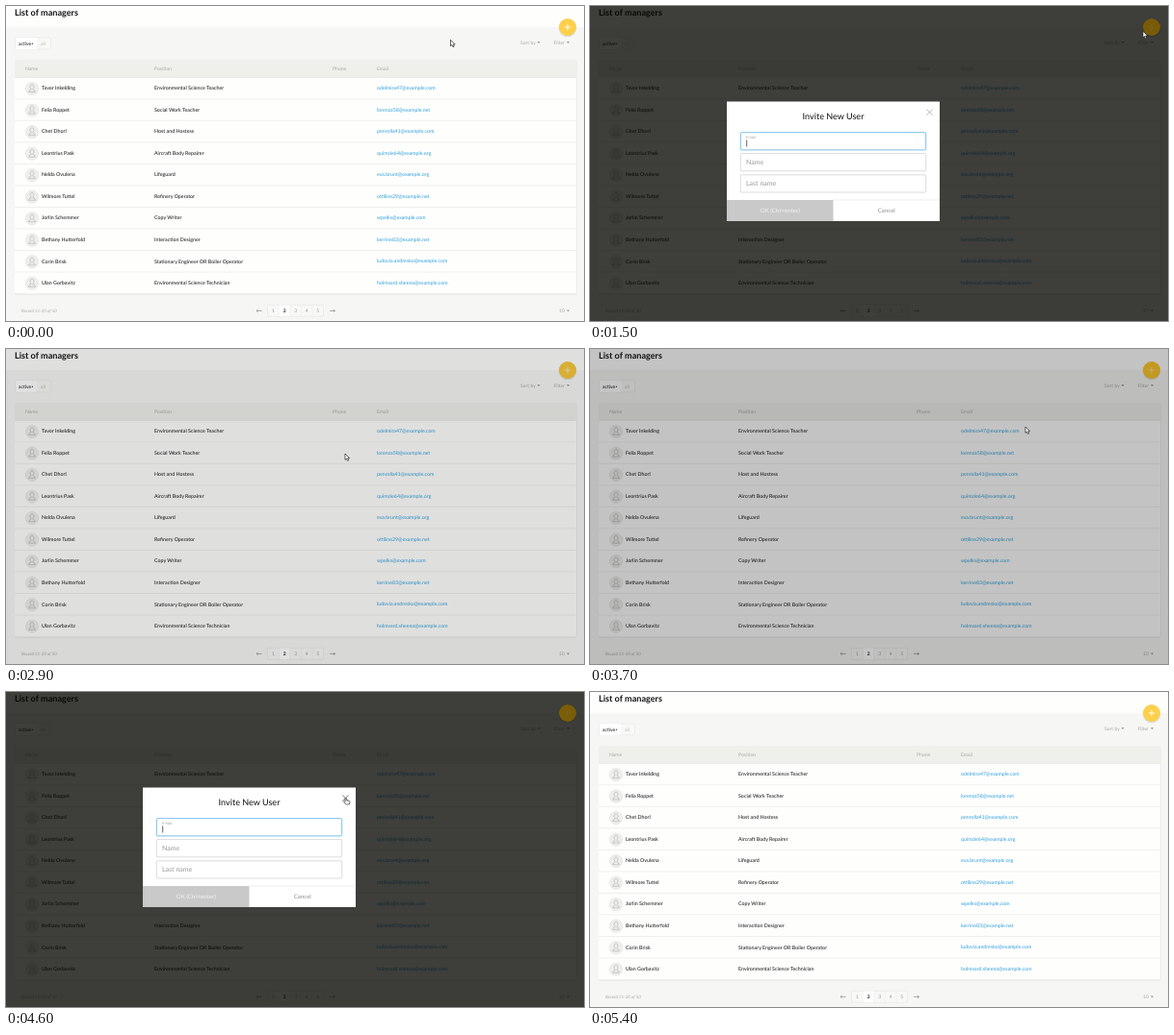
Animation of 600x328 px, one loop 6000 ms. Source, as an HTML page:

```html
<!DOCTYPE html>
<html lang="en">
<head>
<meta charset="utf-8">
<title>List of managers</title>
<style>
  html, body { margin: 0; width: 100%; height: 100%; overflow: hidden; background: #f6f6f4; }
  svg { display: block; width: 600px; height: 328px; }
  text { font-family: Lato, "Open Sans", sans-serif; text-rendering: geometricPrecision; }
</style>
</head>
<body>
<svg id="stage" viewBox="0 0 600 328" xmlns="http://www.w3.org/2000/svg"></svg>
<script>
const stage = document.getElementById('stage');
const LOOP = 6000, STEP = 100;

function add(parent, tag, attrs, text) {
  const el = document.createElementNS('http://www.w3.org/2000/svg', tag);
  for (const key in attrs) el.setAttribute(key, attrs[key]);
  if (text) el.textContent = text;
  parent.appendChild(el);
  return el;
}
const group = (parent = stage) => add(parent, 'g', {});
const rect = (p, x, y, width, height, fill, more) =>
  add(p, 'rect', { x, y, width, height, fill, ...more });
const label = (p, x, y, size, fill, text, more) =>
  add(p, 'text', { x, y, 'font-size': size, fill, ...more }, text);
const path = (p, d, stroke, width, more) =>
  add(p, 'path', { d, stroke, 'stroke-width': width, fill: 'none', ...more });
const mid = { 'text-anchor': 'middle' };
const bold = { 'font-weight': 700 };

// Page
const page = group();
const GREY = '#a9a9a7';
rect(page, 0, 0, 600, 328, '#f6f6f4');
rect(page, 0, 0, 600, 22, '#fefefd');
label(page, 9, 10.2, 9.1, '#161616', 'List of managers', bold);

rect(page, 9.5, 33, 37, 12, '#f8f8f6', { stroke: '#e6e6e4', 'stroke-width': .6, rx: 1 });
rect(page, 10, 33, 22, 12, '#fff', { rx: 1 });
label(page, 13, 40.6, 5, '#222', 'active', { 'font-weight': 500 });
add(page, 'circle', { cx: 27.4, cy: 39.2, r: .7, fill: '#444' });
label(page, 36, 40.6, 5, '#b8b8b6', 'all');

function menu(x, y, text, arrowX) {
  label(page, x, y, 5, GREY, text);
  add(page, 'path', { d: `M${arrowX - 1.5} ${y - 2.7}h3l-1.5 2z`, fill: '#999' });
}
menu(534, 39.8, 'Sort by', 553);
menu(568.5, 39.8, 'Filter', 583.5);

// Table
const COLS = [20, 154, 339, 385];
const ROWS = [
  ['Tavor Inkelding', 'Environmental Science Teacher', 'odelmira47@example.com'],
  ['Felia Roppet', 'Social Work Teacher', 'lorenza58@example.net'],
  ['Chet Dhorl', 'Host and Hostess', 'penrolla41@example.com'],
  ['Leontrius Pask', 'Aircraft Body Repairer', 'quimzie64@example.org'],
  ['Nelda Ovulena', 'Lifeguard', 'eva.brunt@example.org'],
  ['Wilmore Tuttel', 'Refinery Operator', 'ottiline29@example.net'],
  ['Jorlin Schemmer', 'Copy Writer', 'wpelks@example.com'],
  ['Bethany Hutterfold', 'Interaction Designer', 'kerrine83@example.net'],
  ['Corin Brisk', 'Stationary Engineer OR Boiler Operator', 'ludovia.andresko@example.com'],
  ['Ulan Gorbavitz', 'Environmental Science Technician', 'holmvard.sheena@example.com']
];
rect(page, 9, 56.5, 583.5, 244, '#e3e3e1', { rx: 1.5 });
rect(page, 9, 56, 583, 243.5, '#fefefd', { rx: 1.5 });
rect(page, 9, 56, 583, 18.3, '#efefec', { rx: 1.5 });
path(page, 'M9 74.4H592', '#dededb', .6);
['Name', 'Position', 'Phone', 'Email'].forEach((t, i) => label(page, COLS[i], 66.8, 5.1, GREY, t));

ROWS.forEach(([name, job, mail], i) => {
  const y = 85.4 + i * 22.53;
  add(page, 'circle', { cx: 27, cy: y + .6, r: 6.6, fill: '#efefed', stroke: '#dededc', 'stroke-width': .6 });
  path(page, `M23.6 ${y + 4.2}q.2-2.1 2.4-2.5v-.9a2 2.4 0 1 1 2 0v.9q2.2.4 2.4 2.5z`, '#aaaaa8', .6);
  label(page, 37, y + 1.9, 5.3, '#222', name, { 'font-weight': 500 });
  label(page, COLS[1], y + 1.9, 5.3, '#222', job, { 'font-weight': 500 });
  label(page, COLS[3], y + 1.6, 5.25, '#2fa0dc', mail);
  if (i < ROWS.length - 1) path(page, `M9 ${y + 11.4}H592`, '#e6e6e3', .6);
});

// Pager
label(page, 16, 318.8, 4.5, GREY, 'Record 11-20 of 50', { 'font-style': 'italic' });
path(page, 'M265.5 317.4h-5.5m1.5-1.4l-1.5 1.4l1.5 1.4M336 317.4h5.5m-1.5-1.4l1.5 1.4l-1.5 1.4', '#888', .7);
rect(page, 271.5, 311.3, 58, 12, '#f8f8f6', { stroke: '#e4e4e2', 'stroke-width': .6, rx: 1 });
rect(page, 283.2, 311.5, 11.6, 11.6, '#fff');
for (let n = 1; n <= 5; n++) {
  const x = 266 + n * 11.55;
  if (n < 5) path(page, `M${x + 5.7} 311.3v12`, '#e8e8e6', .5);
  label(page, x, 319.1, 5, n === 2 ? '#222' : '#999', String(n), n === 2 ? { ...mid, ...bold } : mid);
}
menu(574, 319.1, '10', 583.5);

// Round button
add(page, 'circle', { cx: 583, cy: 22.8, r: 9.3, fill: '#000', opacity: .1 });
const button = add(page, 'circle', { cx: 583, cy: 22, r: 9, fill: '#fdd04c' });
path(page, 'M583 18.8v6.4M579.8 22h6.4', '#fff', .9);

const shade = rect(stage, 0, 0, 600, 328, '#040400');
const glow = add(stage, 'circle', { cx: 583, cy: 22, r: 9, fill: '#c49000' });

// Dialog
const dialog = group();
rect(dialog, 142, 99.5, 221, 124.5, '#fff');
label(dialog, 252.5, 118.3, 9.05, '#222', 'Invite New User', { ...mid, 'font-weight': 500 });
const cross = path(dialog, 'M349.4 107.6l6.2 6.2m0-6.2l-6.2 6.2', '#999', .7);
const fields = [131.7, 153.6, 175.8].map(y =>
  rect(dialog, 156.3, y, 192.4, 18.2, '#fff', { stroke: '#d2d2d2', 'stroke-width': .8, rx: 1 }));
const hint = label(dialog, 162, 142.8, 7, '#999', 'E-Mail');
label(dialog, 162, 164.6, 7, '#999', 'Name');
label(dialog, 162, 186.8, 7, '#999', 'Last name');
const caret = path(dialog, 'M162.7 139.5v7', '#222', .7);
rect(dialog, 142, 202, 110.5, 22, '#c9c9c9');
path(dialog, 'M252.5 202H363', '#e2e2e2', .6);
label(dialog, 197.3, 214.8, 6.1, '#f4f4f4', 'OK (Ctrl+enter)', mid);
label(dialog, 307.8, 214.8, 6.1, '#8c8c8c', 'Cancel', mid);

// Pointers, tip at 0,0
const pointer = group();
const outline = { fill: '#fff', 'stroke-linejoin': 'round' };
const arrow = path(pointer, 'M0 0v6.4l1.5-1.3l1 2.3l1.2-.5l-1-2.2h2z', '#222', .7, outline);
const hand = path(pointer,
  'M0 .2q.6-.5 1.1 0l.2 2.3l3 .6q.7.2.6 1l-.5 2.6h-3.6l-2-2.5q-.2-.9.6-.7l.8.7z', '#222', .6, outline);

// Tracks: [ms, value, ...]
const SHADE = [[900, 0], [1000, .2], [1100, .41], [1200, .59], [1300, .71], [1400, .77], [2500, .77],
  [2600, .69], [2700, .5], [2900, .12], [3000, 0], [3600, 0], [3700, .23], [3800, .43], [3900, .6],
  [4000, .71], [4100, .77], [4800, .77], [4900, .69], [5000, .5], [5200, .12], [5300, 0]];
const DIALOG = [[1100, 0], [1400, 1], [2400, 1], [2600, .5], [2800, 0],
  [3800, 0], [4100, 1], [4700, 1], [4900, .5], [5100, 0]];
const POINTER = [[200, 461.5, 35.3], [400, 490, 34], [700, 565, 28], [900, 580.5, 25.3], [1400, 579, 25.6],
  [1500, 574, 26.3], [1600, 521, 47], [1800, 440, 80], [2000, 380, 101], [2200, 352, 109], [3000, 352, 109],
  [3200, 440, 75], [3400, 579, 25.5], [3600, 578, 26], [3700, 452, 81], [3800, 400, 97], [4000, 352, 110.3],
  [5000, 352, 110.3], [5200, 372, 50], [5400, 390, -12]];
const HAND = [[900, 1400], [2200, 2900], [3400, 3600], [4000, 5000]];

function sample(track, t) {
  const i = track.findIndex(k => k[0] > t);
  if (i === 0) return track[0].slice(1);
  if (i < 0) return track[track.length - 1].slice(1);
  const a = track[i - 1], b = track[i], p = (t - a[0]) / (b[0] - a[0]);
  return a.slice(1).map((v, j) => v + (b[j + 1] - v) * p);
}
const set = (el, name, value) => el.setAttribute(name, value);
const show = (el, on) => set(el, 'visibility', on ? 'inherit' : 'hidden');

function draw(now) {
  const t = Math.floor((now % LOOP) / STEP) * STEP;
  const [dark] = sample(SHADE, t), [open] = sample(DIALOG, t), [x, y] = sample(POINTER, t);
  const focus = open === 1;
  const overCross = (t >= 2200 && t < 3000) || (t >= 4000 && t < 5000);

  set(shade, 'opacity', dark);
  set(glow, 'opacity', .45 * Math.min(1, dark / .25));
  set(button, 'fill', t >= 800 && t < 1600 ? '#f8c83c' : '#fdd04c');

  set(dialog, 'opacity', open);
  set(dialog, 'transform', `translate(0 ${-13 * (1 - open)})`);
  set(fields[0], 'stroke', focus ? '#55b0e2' : '#d2d2d2');
  set(hint, 'font-size', focus ? 3.6 : 7);
  set(hint, 'y', focus ? 137.8 : 142.8);
  show(caret, focus && (t + 100) % 1000 >= 500);
  set(cross, 'stroke', overCross ? '#333' : '#999');

  const isHand = HAND.some(([a, b]) => t >= a && t < b);
  show(hand, isHand);
  show(arrow, !isHand);
  set(pointer, 'transform', `translate(${x} ${y})`);
}

const start = performance.now();
function tick() {
  draw(performance.now() - start);
  requestAnimationFrame(tick);
}
tick();
</script>
</body>
</html>
```
